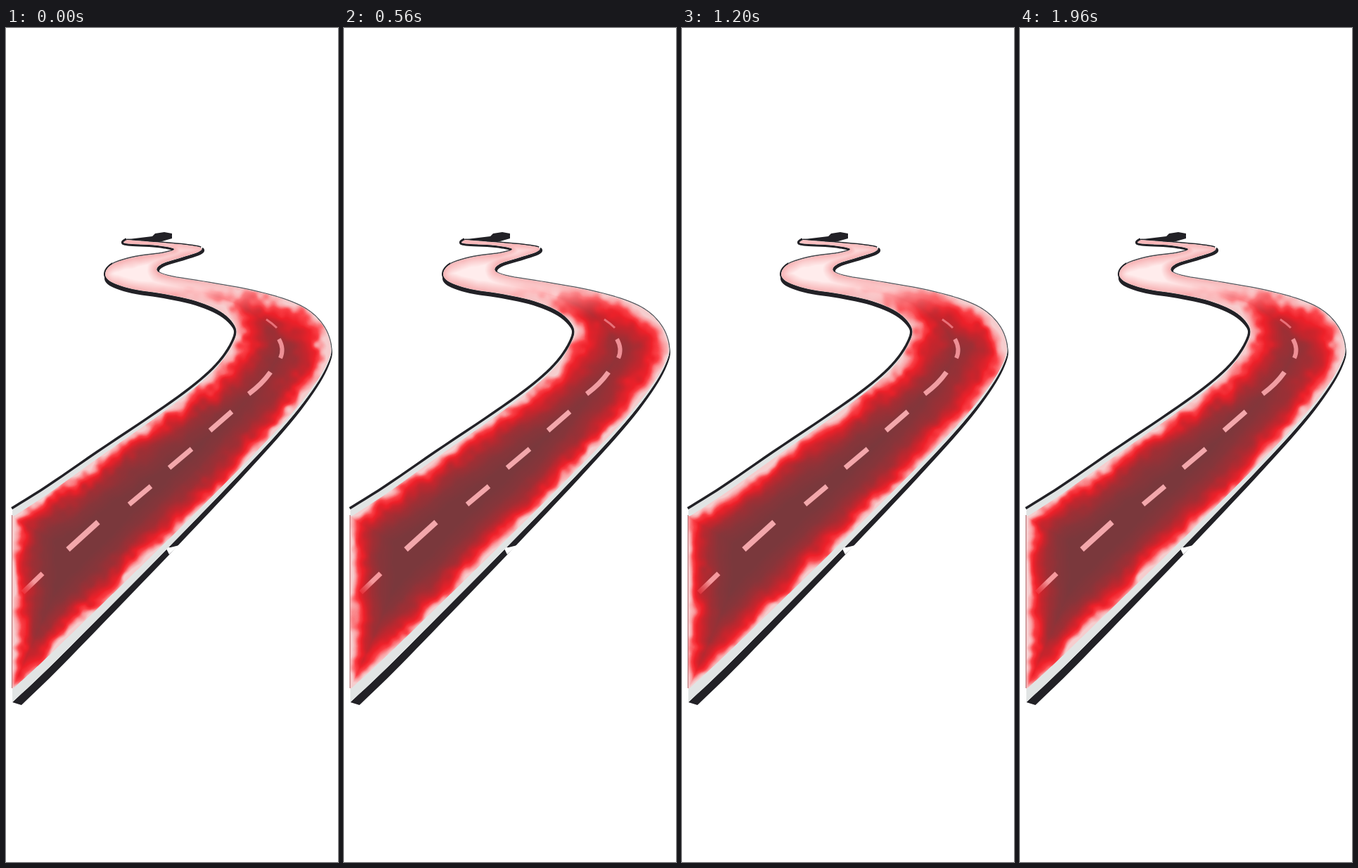
An HTML page with a canvas for the animation above (2 s loop, 472 by 1185 pixels).

```html
<!DOCTYPE html>
<html lang="en">
<head>
<meta charset="utf-8">
<title>Glowing road</title>
<style>
  html, body { margin: 0; width: 100%; height: 100%; overflow: hidden; background: #fff; }
  canvas { display: block; width: 472px; height: 1185px; }
</style>
</head>
<body>
<canvas id="stage" width="472" height="1185"></canvas>
<script>
const W = 472, H = 1185, TOP = 290, ROWS = 672, LOOP = 2000, STEP = 40;
const INK = '#222126';

const leftEdge = spline([
  [9, 684], [60, 652], [130, 604], [215, 547], [270, 507], [305, 474], [325, 442], [325, 423],
  [305, 403], [270, 388], [225, 378], [180, 371], [150, 361], [141, 349], [152, 335],
  [185, 325], [222, 320], [239, 314], [215, 309], [180, 307], [167, 305], [172, 301]]);
const rightEdge = spline([
  [9, 958], [60, 910], [130, 840], [232, 737], [330, 636], [400, 560], [440, 508], [459, 473],
  [462, 452], [453, 426], [432, 403], [400, 387], [350, 373], [290, 362], [235, 353],
  [215, 345], [222, 335], [250, 326], [274, 318], [277, 312], [255, 308], [210, 304], [172, 301]]);

const clamp = (v, lo = 0, hi = 1) => Math.min(hi, Math.max(lo, v));
const mix = (a, b, k) => a + (b - a) * k;
const smooth = (lo, hi, v) => { const k = clamp((v - lo) / (hi - lo)); return k * k * (3 - 2 * k); };

// Catmull-Rom curve through the points, as a polyline with 6 pieces per span
function spline(points) {
  const at = i => points[Math.min(points.length - 1, Math.max(0, i))];
  const out = [];
  for (let i = 0; i < points.length - 1; i++) {
    const [a, b, c, d] = [at(i - 1), at(i), at(i + 1), at(i + 2)];
    for (let j = 0; j < 6; j++) {
      const u = j / 6;
      out.push([0, 1].map(n => b[n] + 0.5 * u * (c[n] - a[n] +
        u * (2 * a[n] - 5 * b[n] + 4 * c[n] - d[n] + u * (3 * (b[n] - c[n]) + d[n] - a[n])))));
    }
  }
  out.push(at(points.length));
  return out;
}

function layer(height = H) {
  const canvas = document.createElement('canvas');
  canvas.width = W;
  canvas.height = height;
  return canvas.getContext('2d', { willReadFrequently: true });
}

function trace(g, points) {
  g.beginPath();
  points.forEach(([x, y]) => g.lineTo(x, y));
}

function fillShape(g, points, color) {
  trace(g, points);
  g.closePath();
  g.fillStyle = color;
  g.fill();
}

function strokeLine(g, points, color, width) {
  trace(g, points);
  g.strokeStyle = color;
  g.lineWidth = width;
  g.stroke();
}

// Part of an edge between two control points
const part = (edge, from, to) => edge.slice(from * 6, to * 6 + 1);

function drawBase(g) {
  g.fillStyle = '#fff';
  g.fillRect(0, 0, W, H);
  g.lineJoin = 'round';

  const near = part(rightEdge, 0, 9);
  const cast = near.map(([x, y]) => {
    const k = clamp((y - 440) / 520);
    return [x + mix(1, 13, k), y + mix(2, 4, k)];
  });
  fillShape(g, near.concat(cast.reverse()), INK);
  fillShape(g, [[227, 738], [234, 738], [246, 735], [232, 748]], '#fff');

  strokeLine(g, part(leftEdge, 0, 7), INK, 7);
  const under = part(leftEdge, 6, 13);
  fillShape(g, under.concat(under.map(([x, y]) => [x - 1, y + 6]).reverse()), INK);
  strokeLine(g, part(leftEdge, 6, 14), INK, 4);
  strokeLine(g, part(leftEdge, 14, 17), '#454348', 3);
  strokeLine(g, part(leftEdge, 17, 21), INK, 6);
  strokeLine(g, part(rightEdge, 8, 15), '#55545a', 2.5);
  strokeLine(g, part(rightEdge, 15, 19).map(([x, y]) => [x + 1, y + 2]), INK, 5);
  strokeLine(g, part(rightEdge, 19, 22), INK, 3);
  fillShape(g, [[166, 301], [208, 296], [212, 292], [225, 290], [236, 292],
    [236, 299], [222, 303], [200, 304], [168, 304]], INK);

  fillShape(g, leftEdge.concat(rightEdge.slice().reverse()), '#e1e4e4');
  g.fillStyle = '#b36a6d';
  g.fillRect(8, 692, 1, 246);
}

function drawDashes(g) {
  const fade = g.createLinearGradient(24, 801, 50, 777);
  fade.addColorStop(0, 'rgba(245,70,78,.5)');
  fade.addColorStop(0.6, '#f5999d');
  const pink = '#f3a7ab';
  const dash = (color, width, d) => {
    g.strokeStyle = color;
    g.lineWidth = width;
    g.stroke(new Path2D(d));
  };
  dash(fade, 7, 'M24 802L52 775');
  dash(pink, 8, 'M88 741L131 702');
  dash(pink, 7, 'M175 677L206 651');
  dash(pink, 7, 'M232 625L264 598');
  dash(pink, 7, 'M290 572L321 545');
  dash('#f19da2', 7, 'M345 520Q364 506 376 489');
  dash('#ee8f95', 6, 'M390 469Q396 456 388 442');
  dash('#e97078', 3, 'M385 426Q379 420 370 414');
}

function distanceTo(edge, x, y) {
  let best = Infinity;
  for (let i = 1; i < edge.length; i++) {
    const [ax, ay] = edge[i - 1];
    const dx = edge[i][0] - ax, dy = edge[i][1] - ay;
    const px = x - ax, py = y - ay;
    const u = clamp((px * dx + py * dy) / (dx * dx + dy * dy || 1));
    const ex = px - u * dx, ey = py - u * dy;
    best = Math.min(best, ex * ex + ey * ey);
  }
  return Math.sqrt(best);
}

// Every surface pixel with its depth from the kerb and its share of the red glow
function surveyRoad() {
  const g = layer();
  fillShape(g, leftEdge.concat(rightEdge.slice().reverse()), '#000');
  const mask = g.getImageData(0, TOP, W, ROWS).data;
  const pixels = [];
  for (let row = 0; row < ROWS; row++) {
    for (let x = 9; x < W; x++) {
      const index = (row * W + x) * 4;
      if (mask[index + 3] < 128) continue;
      const y = row + TOP;
      const leftKerb = clamp((y - 450) / 240, 0, 1.1) * 9;
      const rightKerb = clamp((y - 440) / 520) * 14;
      const depth = Math.min(
        distanceTo(leftEdge, x + 0.5, y + 0.5) - leftKerb,
        distanceTo(rightEdge, x + 0.5, y + 0.5) - rightKerb,
        y > 690 ? x - 8 : Infinity);
      if (depth < 0) continue;
      pixels.push({
        x, y, index, depth,
        heat: depth * mix(0.62, 1, smooth(440, 620, y)),
        glow: smooth(395, 485, y + 0.2 * x)
      });
    }
  }
  return pixels;
}

// Value noise on a 64 x 64 x 8 lattice that wraps on every axis
let seed = 20;
const lattice = Float32Array.from({ length: 64 * 64 * 8 }, () => {
  seed = (Math.imul(seed, 1664525) + 1013904223) >>> 0;
  return seed / 2147483648 - 1;
});
const ease = f => f * f * (3 - 2 * f);

function noise(x, y, z) {
  const xi = Math.floor(x), yi = Math.floor(y), zi = Math.floor(z);
  const u = ease(x - xi), v = ease(y - yi), w = ease(z - zi);
  const x0 = xi & 63, x1 = (xi + 1) & 63;
  const y0 = (yi & 63) << 6, y1 = ((yi + 1) & 63) << 6;
  const plane = z => mix(
    mix(lattice[z + y0 + x0], lattice[z + y0 + x1], u),
    mix(lattice[z + y1 + x0], lattice[z + y1 + x1], u), v);
  return mix(plane((zi & 7) << 12), plane(((zi + 1) & 7) << 12), w);
}

// Colour by depth: pale rim, bright red, then dark asphalt
const stops = [
  [0, 246, 205, 206], [4, 250, 158, 161], [9, 251, 62, 69], [14, 238, 32, 41],
  [21, 201, 36, 44], [32, 160, 46, 52], [46, 135, 53, 58], [64, 122, 56, 60]];
const ramp = Array.from({ length: 257 }, (_, i) => {
  const depth = i / 4;
  const n = Math.max(1, stops.findIndex(s => s[0] >= depth));
  const a = stops[n - 1], b = stops[n];
  return [1, 2, 3].map(c => mix(a[c], b[c], (depth - a[0]) / (b[0] - a[0])));
});

const base = layer();
drawBase(base);
const surface = surveyRoad();
const fire = layer(ROWS);
const image = fire.createImageData(W, ROWS);
const stage = document.getElementById('stage').getContext('2d');

function drawFire(phase) {
  const z = phase * 8, data = image.data;
  for (const p of surface) {
    const n = noise(p.x / 25, p.y / 25, z) * 6 + noise(p.x / 10 + 7, p.y / 10, z * 2) * 4;
    const calm = 1 - 0.6 * clamp((p.heat - 20) / 30);
    const hot = ramp[Math.round(clamp(p.heat + n * calm, 0, 64) * 4)];
    const pale = clamp(p.depth / 14 + n * 0.02);
    const i = p.index;
    data[i] = mix(mix(247, 255, pale), hot[0], p.glow);
    data[i + 1] = mix(mix(178, 236, pale), hot[1], p.glow);
    data[i + 2] = mix(mix(180, 236, pale), hot[2], p.glow);
    data[i + 3] = 255 * clamp(p.depth + 0.3);
  }
  fire.putImageData(image, 0, 0);
}

let shown = -1;
function render(now) {
  const tick = Math.floor((now % LOOP) / STEP);
  if (tick !== shown) {
    shown = tick;
    drawFire(tick * STEP / LOOP);
    stage.drawImage(base.canvas, 0, 0);
    stage.drawImage(fire.canvas, 0, TOP);
    drawDashes(stage);
  }
  requestAnimationFrame(render);
}
render(0);
</script>
</body>
</html>
```
